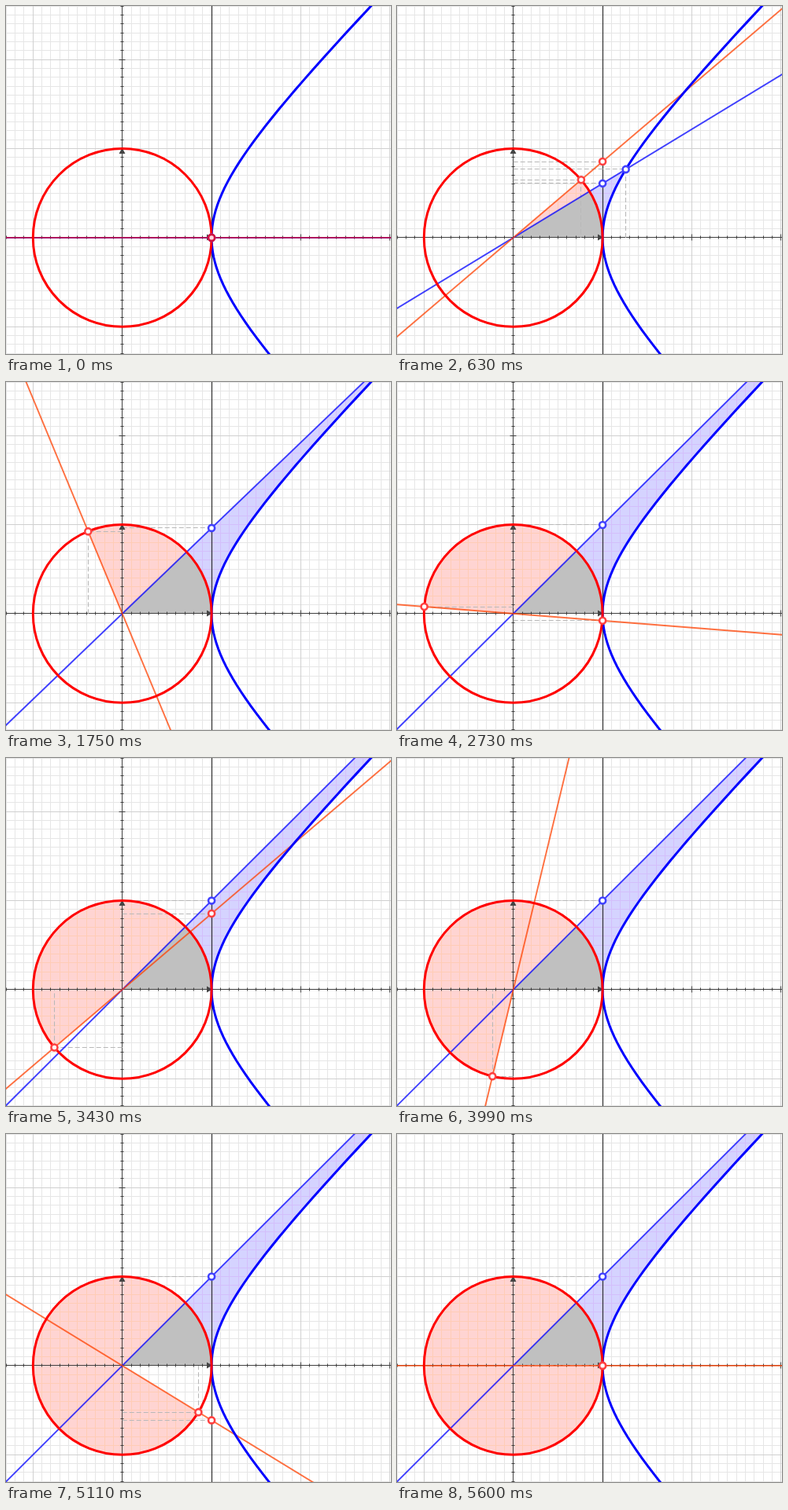
An HTML page that plays this animation: 489 by 443 pixels, repeating every 5670 ms.

```html
<!DOCTYPE html>
<html>
<head>
<meta charset="utf-8">
<style>
html, body { margin: 0; width: 100%; height: 100%; overflow: hidden; background: #fff; }
svg { display: block; }
</style>
</head>
<body>
<svg id="stage" width="489" height="443" viewBox="0 0 489 443" fill="none"></svg>
<script>
const W = 489, H = 443, CX = 147.7, CY = 294.9, U = 113.4;
const STEP = 70, COUNT = 81, FAR = 4;
const stage = document.getElementById('stage');

function add(tag, attrs, parent = stage) {
  const el = document.createElementNS('http://www.w3.org/2000/svg', tag);
  set(el, attrs);
  parent.appendChild(el);
  return el;
}
function set(el, attrs) {
  for (const key in attrs) el.setAttribute(key, attrs[key]);
}
const px = x => CX + U * x;
const py = y => CY - U * y;
const pt = (x, y) => px(x).toFixed(2) + ' ' + py(y).toFixed(2);
const crisp = v => Math.floor(v) + 0.5;

// Grid and tick paths
let minor = '', major = '', ticks = '';
for (let i = -30; i <= 31; i++) {
  const x = crisp(px(i / 10)), y = crisp(py(i / 10));
  const big = i % 10 === 0, r = big ? 4 : 2;
  const lines = `M${x} 0V${H}M0 ${y}H${W}`;
  if (big) major += lines; else minor += lines;
  ticks += `M${x} ${294.5 - r}v${2 * r}M${147.5 - r} ${y}h${2 * r}`;
}
add('path', { d: minor, stroke: '#e6e6e6' });
add('path', { d: major, stroke: '#d0d0d0' });

// A filled region whose grid shows through in a tint
function region(id, fill, tint) {
  const shape = add('path', { fill });
  const clip = add('path', {}, add('clipPath', { id }));
  add('path', { d: minor + major, stroke: tint, 'clip-path': `url(#${id})` });
  return d => { set(shape, { d }); set(clip, { d }); };
}
const setHyper = region('hyper', '#d5d3ff', '#d3bffb');
const setSector = region('sector', '#ffd4d2', '#ffccb6');
const common = add('path', { fill: '#c0c0c0' });

add('path', { d: `M147.5 0V${H}M0 294.5H${W}` + ticks, stroke: '#404040' });
add('path', { d: `M261.5 0V${H}`, stroke: '#303030', 'stroke-width': 1.2 });
const dashes = add('path', { stroke: '#b8b8b8', 'stroke-width': 1.1, 'stroke-dasharray': '6 3' });
add('path', { d: 'M262 294.5l-7 -4v8zM147.5 180.5l-4 7.5h8z', fill: '#444' });

const blueLine = add('path', { stroke: '#00f', 'stroke-opacity': 0.75, 'stroke-width': 1.9 });
const redLine = add('path', { stroke: '#ff4000', 'stroke-opacity': 0.75, 'stroke-width': 1.9 });

function hyperbola(from, to) {
  const pts = [];
  for (let i = 0; i <= 80; i++) {
    const u = from + (to - from) * i / 80;
    pts.push(pt(Math.cosh(u), Math.sinh(u)));
  }
  return pts.join('L');
}
add('path', { d: 'M' + hyperbola(-2, 2.6), stroke: '#00f', 'stroke-width': 3 });
add('circle', { cx: CX, cy: CY, r: U, stroke: '#f00', 'stroke-width': 3 });

const dot = color => add('circle', {
  r: 4, fill: '#fff', stroke: color, 'stroke-width': 2.6
});
const BLUE = '#4040ff', RED = '#ff4040';
const tanhDot = dot(BLUE), hyperDot = dot(BLUE), tanDot = dot(RED), circleDot = dot(RED);
const place = (el, x, y) => set(el, { cx: px(x), cy: py(y) });

function sector(a) {
  const arc = b => `A${U} ${U} 0 0 0 ${pt(Math.cos(b), Math.sin(b))}`;
  return `M${pt(0, 0)}L${pt(1, 0)}${arc(a / 2)}${arc(a)}Z`;
}
const through = (x, y) => `M${pt(-6 * x, -6 * y)}L${pt(6 * x, 6 * y)}`;
const across = (x, y) => `M${px(0)} ${crisp(py(y))}H${px(x)}`;
const down = (x, y) => `M${crisp(px(x))} ${py(y)}V${py(0)}`;

function draw(ms) {
  const k = Math.floor(ms / STEP) % COUNT;
  const t = 2 * Math.PI * k / (COUNT - 1);
  const c = Math.cos(t), s = Math.sin(t), th = Math.tanh(t);
  const tan = Math.max(-20, Math.min(20, Math.tan(t)));
  const u = Math.min(t, FAR), ch = Math.cosh(u), sh = Math.sinh(u);

  setSector(k ? sector(t) : '');
  setHyper(k ? `M${pt(0, 0)}L${hyperbola(0, u)}Z` : '');
  set(common, { d: k ? sector(Math.atan(th)) : '' });
  set(blueLine, { d: through(1, th) });
  set(redLine, {
    d: through(c, s),
    stroke: k ? '#ff4000' : '#b4004b',
    'stroke-opacity': k ? 0.75 : 1
  });
  set(dashes, {
    d: across(c, s) + down(c, s) + across(1, tan) + across(1, th) + across(ch, sh) + down(ch, sh)
  });
  place(tanhDot, 1, th);
  place(hyperDot, ch, sh);
  place(tanDot, 1, tan);
  place(circleDot, c, s);
  set(circleDot, { stroke: k ? RED : '#d01040', fill: k ? '#fff' : '#ffd8e0' });
}

function tick() {
  draw(performance.now() - start);
  requestAnimationFrame(tick);
}
const start = performance.now();
tick();
</script>
</body>
</html>
```
